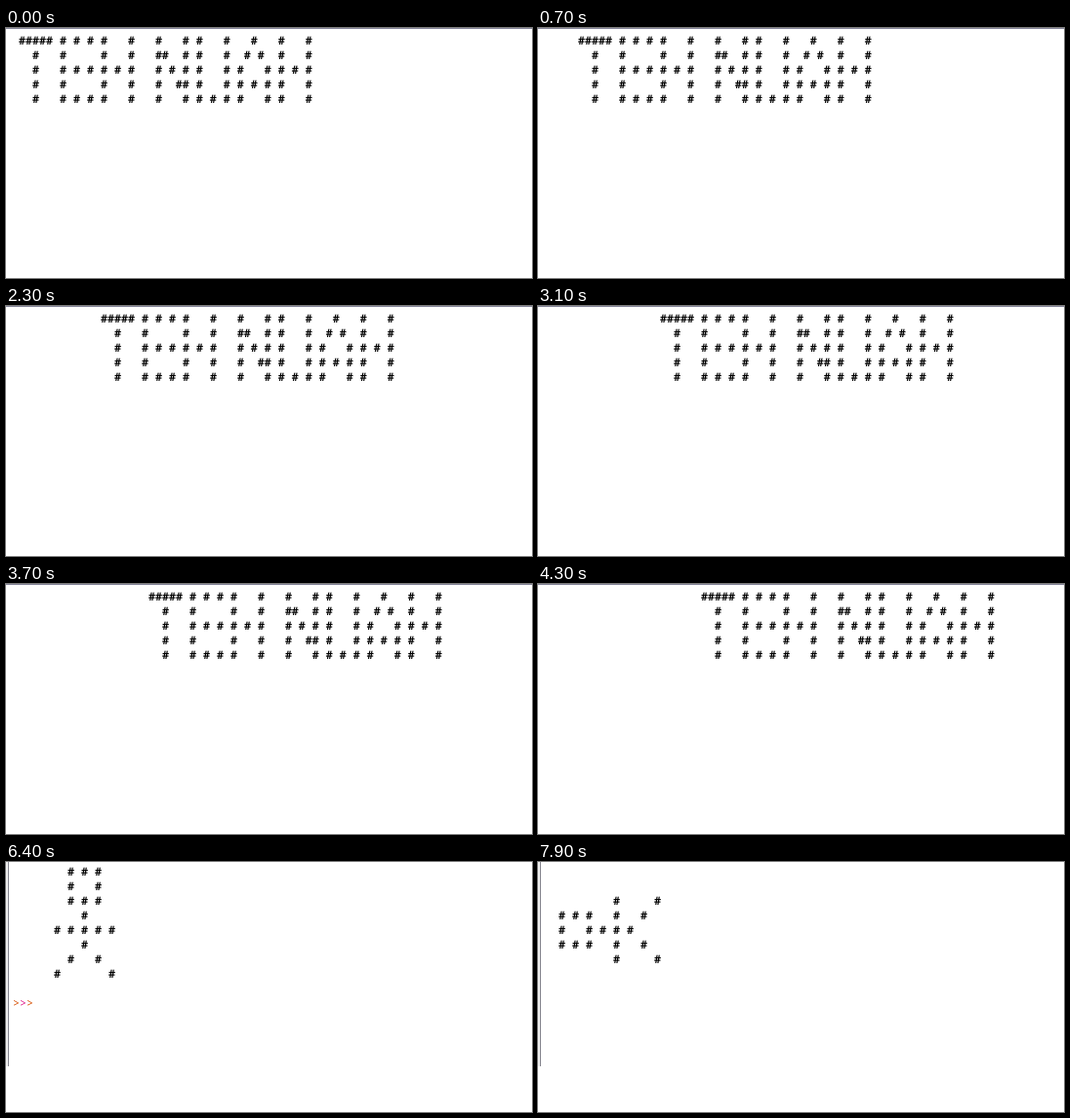
Animation, 539 px wide and 257 px high, one loop 8000 ms. Source, as an HTML page:

```html
<!DOCTYPE html>
<html lang="en">
<head>
<meta charset="utf-8">
<title>Console banner and tumbling figure</title>
<style>
html, body { margin: 0; width: 100%; height: 100%; overflow: hidden; background: #fff; }
svg { display: block; width: 539px; height: 257px; }
text { font: 600 11.667px "Noto Sans Mono", monospace; white-space: pre; text-rendering: geometricPrecision; }
.prompt text { font-weight: normal; }
</style>
</head>
<body>
<svg viewBox="0 0 539 257">
  <g id="bannerView">
    <rect width="539" height="1" fill="#85859a"/>
    <g id="banner"></g>
    <g id="bannerPrompt" class="prompt"></g>
  </g>
  <g id="figureView">
    <rect width="2" height="210" fill="#f0f0f0"/>
    <rect x="2" width="1" height="210" fill="#85858f"/>
    <g id="figure"></g>
    <g id="figurePrompt" class="prompt"></g>
  </g>
</svg>
<script>
const LOOP = 8000, CELL = 7, LINE = 15;
const $ = id => document.getElementById(id);

const GLYPHS = {
  T: ["#####", "  #  ", "  #  ", "  #  ", "  #  "],
  E: ["# # #", "#    ", "# # #", "#    ", "# # #"],
  H: ["#   #", "#   #", "# # #", "#   #", "#   #"],
  N: ["#   #", "##  #", "# # #", "#  ##", "#   #"],
  U: ["#   #", "#   #", "#   #", "#   #", "# # #"],
  A: ["  #  ", " # # ", "#   #", "# # #", "#   #"]
};

const UP = [
  "        # # #",
  "        #   #",
  "        # # #",
  "          #",
  "      # # # # #",
  "          #",
  "        #   #",
  "      #       #"
];
const LEFT = [
  "",
  "",
  "          #     #",
  "  # # #   #   #",
  "  #   # # # #",
  "  # # #   #   #",
  "          #     #"
];
const mirror = row => [...row.padEnd(19)].reverse().join("");
const POSES = [UP, LEFT.map(mirror), [...UP].reverse(), LEFT];

function addText(parent, x, y, str, fill) {
  const el = document.createElementNS("http://www.w3.org/2000/svg", "text");
  el.setAttribute("x", x);
  el.setAttribute("y", y);
  el.setAttribute("fill", fill);
  el.textContent = str;
  parent.append(el);
}

function addRows(parent, rows) {
  rows.forEach((row, i) => row && addText(parent, 0, i * LINE, row, "#000"));
}

function addPrompt(parent, x, y) {
  ["#d8560c", "#e0208c", "#d8560c"].forEach((c, i) => addText(parent, x + i * CELL, y, ">", c));
}

function place(el, x, y) {
  el.setAttribute("transform", `translate(${x} ${y})`);
}

function show(el, on) {
  el.style.display = on ? "" : "none";
}

// Letters sit six cells apart, with a wider gap between words.
const bannerRows = [0, 1, 2, 3, 4].map(r =>
  ["TEH", "NUAH"].map(word => [...word].map(c => GLYPHS[c][r]).join(" ")).join("   "));
addRows($("banner"), bannerRows);
addPrompt($("bannerPrompt"), -1, 92);
addPrompt($("figurePrompt"), 7, 149);

const poseEls = POSES.map(rows => {
  const g = document.createElementNS("http://www.w3.org/2000/svg", "g");
  addRows(g, rows);
  $("figure").append(g);
  return g;
});

function bannerStep(t) {
  if (t < 100) return 0;
  if (t >= 5600) return 28;
  return Math.min(27, Math.floor((t - 100) / 200) + 1);
}

function render(t) {
  const tumbling = t >= 7100;
  show($("bannerView"), t < 6400);
  show($("figureView"), t >= 6400);

  place($("banner"), 13 + CELL * bannerStep(t), 17);
  show($("bannerPrompt"), t >= 5600);

  // Quarter turns clockwise, out to the lower right and back.
  const k = tumbling ? Math.max(1, Math.floor((t - 7100) / 100)) : 1;
  const reach = k <= 5 ? (k - 1) / 4 : (8 - k) / 3;
  const col = Math.round(16 * reach), row = Math.round(6 * reach);
  place($("figure"), 7 + CELL * col, 14 + LINE * row);
  poseEls.forEach((el, i) => show(el, i === (k - 1) % 4));
  show($("figurePrompt"), !tumbling);
}

const start = performance.now();
function tick() {
  render((performance.now() - start) % LOOP);
  requestAnimationFrame(tick);
}
tick();
</script>
</body>
</html>
```
